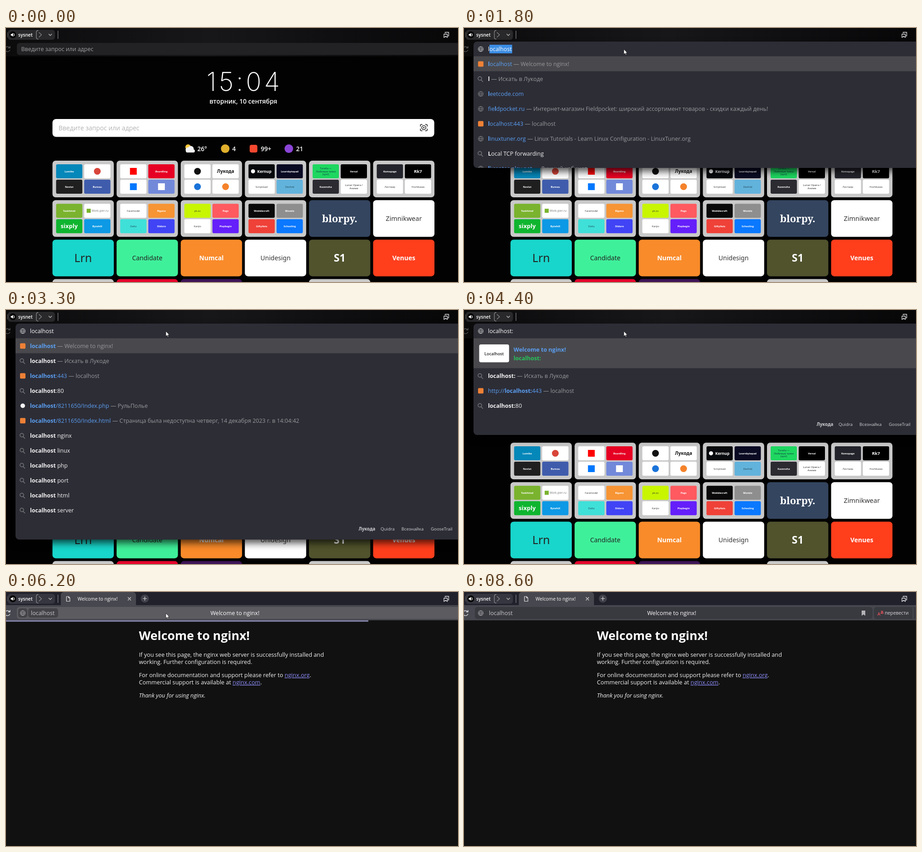
Animation of 998 by 561 pixels, one loop 9.4 s. Source, as an HTML page:

```html
<!DOCTYPE html>
<html lang="ru">
<head>
<meta charset="utf-8">
<title>Welcome to nginx!</title>
<style>
html, body { margin: 0; width: 100%; height: 100%; overflow: hidden; background: #020202; }
svg { display: block; width: 998px; height: 561px; }
text { font-family: "Open Sans", "Noto Sans", sans-serif; white-space: pre; }
.clock { font-family: Inter, sans-serif; letter-spacing: .1em; }
.tile { font-family: "Noto Sans", sans-serif; }
.slab { font-family: "Noto Serif", serif; }
.kana { font-family: "Noto Sans CJK JP", sans-serif; }
.shade { filter: drop-shadow(0 8px 8px #000a); }
</style>
</head>
<body>
<svg id="stage" viewBox="0 0 998 561"></svg>
<script>
const stage = document.getElementById('stage');
const LOOP = 9400, STEP = 100, UI = 12.5;
const BLUE = '#5b9ff2', GREY = '#98989c', WHITE = '#f2f2f2';

const esc = s => s.replace(/&/g, '&amp;');
const rect = (x, y, w, h, fill, r = 0, extra = '') =>
  `<rect x="${x}" y="${y}" width="${w}" height="${h}" rx="${r}" fill="${fill}" ${extra}/>`;
const disc = (x, y, r, fill) => `<circle cx="${x}" cy="${y}" r="${r}" fill="${fill}"/>`;
const line = (d, color, w = 1.3) =>
  `<path d="${d}" fill="none" stroke="${color}" stroke-width="${w}" stroke-linecap="round" stroke-linejoin="round"/>`;
const raw = (x, y, body, fill, size = UI, extra = '') =>
  `<text x="${x}" y="${y}" fill="${fill}" font-size="${size}" ${extra}>${body}</text>`;
const text = (x, y, s, ...rest) => raw(x, y, esc(s), ...rest);
const span = (s, attrs = '') => `<tspan ${attrs}>${esc(s)}</tspan>`;
const MID = 'text-anchor="middle"', BOLD = 'font-weight="700"', SEMI = 'font-weight="600"';

const pen = document.createElement('canvas').getContext('2d');
const widthOf = s => {
  pen.font = UI + 'px "Open Sans", "Noto Sans", sans-serif';
  return pen.measureText(s).width;
};
// value of the last key at or before t
const latest = (keys, t) => keys.filter(k => k[0] <= t).pop()[1];
const between = (keys, t) => {
  const i = keys.findIndex(k => k[0] > t);
  if (i < 0) return keys[keys.length - 1][1];
  const [a, u] = keys[i - 1], [b, v] = keys[i];
  return u + (v - u) * (t - a) / (b - a);
};

// ---------- start page ----------
// background | label (^ breaks the line) | text colour | size | mark (o disc, s square)
const FOLDERS = [
  ['#0487b9|Lumiko', '#fff||||o#d8453a', '#1f1f1f|Novlat', '#3f5cac|Bureau'],
  ['#fff||||s#f00', '#e60023|Boardling', '#fff||||s#07f', '#7289da||||s#fff'],
  ['#fff||||o#111', '#fff|Лукода|#111|10', '#fff||||o#1a73d9', '#fff||||o#f5822a'],
  ['#08090c|Kernup|#fff|8.6|o#fff', '#0a0a23|Learnbytepad', '#fff|Scriptread|#333', '#62b3dc|Devfold|#245'],
  ['#1ed760|Tunelia —^Любимые треки^(vpn!)|#134', '#000|Versal', '#2b2b31|Kazenoha', '#fff|Lunar Opera /^Аниме|#222|6'],
  ['#23242b|Komapage', '#000|Rk7||9.5', '#fff|Листмир|#333', '#fff|Hoshikawa|#333'],
  ['#7ab32e|Taskhired', '#fff|Work-pier.ru|#777|6.3|s#7ab32e', '#0fb52f|sixply||13', '#0d99e5|Bytehill'],
  ['#fff|Facemodel|#333', '#f79433|Rigano', '#3fe0d8|Delta|#245', '#4044f5|Slidoro'],
  ['#c8f500|pk.zu|#333', '#ff5a5f|Pogs', '#fff|Kanjio|#333', '#651ffa|Playbegin'],
  ['#0a0a0a|Wobblecraft', '#8e8e8e|Movelo', '#ef4138|Giftylists', '#0a78ff|Schooling']
];
const BIG = [
  '#34455f|blorpy.|#fff|22', '#fff|Zimnikwear|#333|14.5',
  '#18d6cb|Lrn|#222|25', '#3ff09a|Candidate|#222|14', '#f98b2a|Numcal|#fff|14',
  '#fff|Unidesign|#333|14', '#50532c|S1|#fff|23', '#ff3e1c|Venues|#fff|14'
];
const colX = i => 102.6 + 141.6 * (i % 6);
const rowY = i => 293 + 87.2 * Math.floor(i / 6);

function label(cx, cy, s, fill, size, extra) {
  const rows = s.split('^');
  return rows.map((r, i) =>
    text(cx, cy + size * .36 + (i - (rows.length - 1) / 2) * size * 1.2, r, fill, size, `${MID} ${extra}`)).join('');
}
function chip(x, y, def) {
  const [bg, s, fg, size, mark] = def.split('|'), cy = y + 15.5;
  let out = rect(x, y, 58, 31, bg, 3);
  if (mark) {
    const r = s ? 4.5 : 7.5, mx = s ? x + 10 : x + 29, color = mark.slice(1);
    out += mark[0] === 'o' ? disc(mx, cy, r, color) : rect(mx - r, cy - r, 2 * r, 2 * r, color);
  }
  const weight = !fg || fg === '#fff' || size > 9 ? BOLD : '';
  return out + label(x + (mark ? 35 : 29), cy, s || '', fg || '#fff', +size || 5.6, weight);
}
function buildHome() {
  let s = rect(0, 0, 998, 561, '#020202');
  s += text(526.5, 138.5, '15:04', '#fff', 57, `${MID} class="clock" font-weight="200"`);
  s += text(524, 167, 'вторник, 10 сентября', '#fff', 13.9, `${MID} ${SEMI}`);
  s += rect(102.6, 201, 843, 39.5, '#fff', 8) + text(116, 226, 'Введите запрос или адрес', '#b2b2b2', 14);
  s += line('M915 217v-2q0-2 2-2h2M926 213h2q2 0 2 2v2M930 223v2q0 2-2 2h-2M919 227h-2q-2 0-2-2v-2', '#222', 1.6)
    + line('M918 220a4.5 4.5 0 1 0 9 0a4.5 4.5 0 1 0-9 0', '#222', 1.6) + disc(922.5, 220, 1.6, '#222');
  s += disc(402, 263, 6, '#ffc93c') + disc(402, 269, 5.5, '#f4f4f6') + disc(408, 267, 6.5, '#f4f4f6')
    + rect(397, 268, 20, 7, '#f4f4f6', 3.5);
  s += disc(484, 266.5, 9.5, '#e0b02c') + rect(538, 258, 17, 17, '#f5482f', 4) + disc(624.5, 266.5, 9.5, '#8b45d6');
  [[422.5, '26°'], [499.5, '4'], [562.5, '99+'], [640.5, '21']]
    .forEach(([x, v]) => s += text(x, 271.5, v, '#fff', 13.6, SEMI));
  FOLDERS.forEach((f, i) => {
    const x = colX(i), y = rowY(i);
    s += rect(x, y, 135.4, 81, '#c9c9c9', 7);
    f.forEach((d, j) => s += chip(x + 8 + 62 * (j % 2), y + 8 + 34 * (j >> 1), d));
  });
  BIG.forEach((d, k) => {
    const i = k + FOLDERS.length, x = colX(i), y = rowY(i), [bg, t, fg, size] = d.split('|');
    const weight = fg === '#fff' ? BOLD : 'font-weight="500"';
    s += rect(x, y, 135.4, 81, bg, 7)
      + label(x + 67.7, y + 40.5, t, fg, +size, `${weight} class="${k ? 'tile' : 'slab'}"`);
  });
  ['#c9c9c9', '#e4062b', '#3d1457', '#020202', '#c9c9c9']
    .forEach((c, i) => s += rect(colX(i), rowY(18), 135.4, 81, c, 7));
  return s;
}
const HOME = buildHome();

// ---------- browser frame ----------
const reload = c => line('M8 43.5A5.6 5.6 0 1 0 8.6 49M9 40.5v3.5h-4', c, 1.4);
const globe = (x, y, c) => line(`M${x - 5.5} ${y}a5.5 5.5 0 1 0 11 0a5.5 5.5 0 1 0-11 0h11`
  + `M${x} ${y - 5.5}q-5 5.5 0 11q5-5.5 0-11`, c, 1.1);
const lens = (x, y, c) => line(`M${x - 5} ${y - 1}a4 4 0 1 0 8 0a4 4 0 1 0-8 0M${x + 1.5} ${y + 2}l4 4`, c, 1.5);

function tabStrip(pill) {
  return rect(4, 4, 104, 22, pill, 6) + line('M3.5 10v10', '#555', 1)
    + disc(15, 15, 7.5, '#000')
    + '<path d="M10.5 13.3h2.2l3-2.6v8.6l-3-2.6h-2.2z" fill="#fff"/>'
    + line('M17.5 12.5q1.8 2.5 0 5', '#fff', 1.2)
    + text(27, 18.8, 'sysnet', '#fff', 10.2, SEMI)
    + line('M71 5.5q-4 0-4 4v11q0 4 4 4M73 10l5.5 5-5.5 5', '#8a8a8e', 1.3)
    + line('M94.5 13.5l3.2 3.2 3.2-3.2', '#bbb', 1.3) + rect(114, 6, 1.4, 18, '#77777c')
    + line('M967 13.5h7.5v7.5l-3.7-2.7-3.8 2.7zM969.5 11v-1.5h8v8h-1.5', '#e4e4e6', 1.3);
}
const homeBar = () => '<linearGradient id="glass"><stop stop-color="#0b0b0c"/><stop offset=".45" stop-color="#17171a"/>'
  + '<stop offset="1" stop-color="#070708"/></linearGradient>'
  + rect(0, 0, 998, 62.5, 'url(#glass)') + tabStrip('#29292b') + reload('#555')
  + rect(24, 33, 990, 26.5, '#222225', 6);

// ---------- suggestions ----------
const ASK = ' — Искать в Лукоде';
const NGINX = ['x', 'localhost', ' — Welcome to nginx!'];
const P443 = ['x', 'localhost:443', ' — localhost'];
const P80 = ['s', 'localhost:80'];
const TCP = ['s', 'Local TCP forwarding'];
const PHP = ['p', 'localhost/8211650/Index.php', ' — РульПолье'];
const HTM = ['x', 'localhost/8211650/Index.html', ' — Страница была недоступна четверг, 14 декабря 2023 г. в 14:04:42'];
const TIME = ['s', 'localtime linux'];
const SHOP = ['o', 'market.yandex.ru/catalog--obuv/54605/list?was_redir=1&rt=10&rs=eJwz4g9gnMXInptYVJKaV7yBkREAKAYE4Q%2C%2C&suggest=1&suggest_type=search&suggest'];
const FEST = ['', 'fandomfest.intickets.ru/event/16565930/?locale=ru_RU', ' — Мульти Слёт ЛугоПарк 2024'];

function rowsFor(q) {
  const ask = ['s', q, ASK];
  if (q === 'l') return [NGINX, ask, ['g', 'leetcode.com'],
    ['g', 'fieldpocket.ru', ' — Интернет-магазин Fieldpocket: широкий ассортимент товаров - скидки каждый день!'],
    P443, ['g', 'linuxtuner.org', ' — Linux Tutorials - Learn Linux Configuration - LinuxTuner.org'],
    TCP, ['g', 'lkcenter-play.net', ' — Личный кабинет'], P80, PHP, HTM, TIME];
  if (q.length < 6) return [NGINX, ask, P443, TCP, P80, PHP, HTM, TIME, SHOP, FEST];
  if (q.length < 10) return [NGINX, ask, P443, P80, PHP, HTM,
    ...['nginx', 'linux', 'php', 'port', 'html', 'server'].map(w => ['s', 'localhost ' + w])];
  if (q.length === 10) return [ask, ['x', 'http://localhost:443', ' — localhost'], P80];
  return q.length === 11 ? [ask, P80, P443, PHP, HTM] : [ask, P443, PHP, HTM];
}
const ICONS = {
  s: y => lens(36, y, '#77777c'),
  g: y => globe(37, y, '#77777c'),
  x: y => rect(31, y - 6, 12, 12, '#ee8136', 2),
  p: y => disc(37, y, 5, '#f4f4f4'),
  o: y => disc(37, y, 6.5, '#f5822a')
};
function suggestion([kind, s, tail = ''], y, q) {
  const i = s.toLowerCase().indexOf(q), end = i + q.length;
  const main = i < 0 ? span(s) : span(s.slice(0, i)) + span(s.slice(i, end), BOLD) + span(s.slice(end));
  return (kind && ICONS[kind](y))
    + raw(53, y + 4.5, main + span(tail, `fill="${GREY}"`), kind === 's' ? WHITE : BLUE);
}

const TYPED = [[1700, 'l'], [2000, 'lo'], [2200, 'loc'], [2300, 'loca'], [2400, 'local'], [2700, 'localh'],
  [2800, 'localho'], [3000, 'localhos'], [3300, 'localhost'], [3900, 'localhost:'], [4700, 'localhost:8'], [4900, 'localhost:80']];
const BOTTOM = [[1700, 129], [1800, 309], [1900, 441], [2000, 507], [2200, 441], [2700, 441], [2800, 507],
  [3900, 507], [4300, 276], [4700, 276], [4800, 342], [4900, 309]];

function panel(t) {
  const q = latest(TYPED, t), bottom = between(BOTTOM, t), rows = rowsFor(q), card = q.length > 9;
  const first = card ? 2 : 0, foot = 111 + 33 * (rows.length + first);
  const rest = 'localhost'.slice(q.length), w = widthOf(q);
  let s = rect(21, 30, 990, bottom - 30, '#2d2d36', 8, 'class="shade"')
    + `<clipPath id="fold">${rect(21, 30, 990, bottom - 30, '#fff', 8)}</clipPath><g clip-path="url(#fold)">`;
  s += rect(21, 62.5, 977, card ? 66 : 33, '#49494d') + globe(37, 46.5, '#b4b4b8');
  if (rest) s += rect(53 + w, 37, widthOf(rest) + 1, 19, '#3b8de4');
  s += text(53, 51, q + rest, '#fff');
  if (q.length === 12 && (t < 5300 || t >= 5900)) s += rect(53 + w, 36.5, 1.3, 19, '#fff');
  if (card) {
    const colon = q.endsWith(':');
    s += rect(33.5, 76, 66, 39.5, '#fff', 4) + text(66.5, 99.5, 'Localhost', '#222', 9.3, `${MID} ${SEMI}`)
      + text(109.5, 91.5, 'Welcome to nginx!', BLUE, 12.6, BOLD)
      + text(109.5, 111, colon ? q : 'localhost', '#27c45c', UI, colon ? BOLD : '');
  }
  rows.forEach((r, i) => s += suggestion(r, 79.5 + 33 * (i + first), q));
  [[778.5, 'Лукода', BOLD], [827, 'Quidra'], [873, 'Всезнайка'], [938, 'GooseTrail']]
    .forEach(([x, n, b = '']) => s += text(x, foot - 20.5, n, '#d0d0d4', 9.7, b));
  return s + '</g>';
}

// ---------- web page ----------
function page(t) {
  const hover = t < 8300, ready = t >= 7100, tool = '#47474f', field = hover ? '#5b5b60' : '#393940';
  let s = rect(0, 0, 998, 561, '#111') + rect(0, 0, 998, 30, '#21212c') + rect(0, 29, 998, 33.5, tool)
    + `<path d="M121 30V8q0-8 8-8h150q8 0 8 8v22z" fill="${tool}"/>` + tabStrip('#363640') + reload('#e0e0e4');
  s += line('M133.5 10h4.5l3 3v7.5h-7.5zM138 10v3h3', '#e4e4e6', 1.2)
    + text(158, 19, 'Welcome to nginx!', '#fff', 10.3)
    + line('M269.5 12l6 6M275.5 12l-6 6', '#ddd', 1.2) + disc(306.5, 14.5, 9, '#41414b')
    + line('M302.5 14.5h8M306.5 10.5v8', '#ddd', 1.2);
  s += rect(24, 33, ready ? 878 : 990, 26.5, field, 6);
  if (hover) s += rect(27, 36, 20, 20.5, '#434347', 5) + rect(49, 36, 66, 20.5, '#434347', 5);
  s += globe(37, 46.5, '#9a9a9f') + text(55, 51, 'localhost', '#c9c9cd')
    + text(ready ? 458.5 : 505.5, 51, 'Welcome to nginx!', '#fff', 12.6, MID);
  if (ready) {
    const ink = t < 7300 ? .2 : t < 7400 ? .6 : 1;
    s += '<path d="M878 41h8v11.5l-4-3-4 3z" fill="#b4b4b8"/>' + rect(905, 33, 110, 26.5, '#393940', 6)
      + `<g opacity="${ink}">` + text(913, 51.5, 'A', '#f0565a', 9.5, SEMI)
      + text(919, 47.5, 'あ', '#f0565a', 8, `${BOLD} class="kana"`)
      + text(929, 49.5, 'перевести', '#d8d8dc', 10.4) + '</g>' + rect(991, 34, 1, 25, '#55555c');
  }
  if (t >= 6200) {
    const p = (y, body, extra) => raw(293.5, y, body, '#f4f4f4', 12.7, extra);
    const link = u => span(u, 'fill="#8c8cf8" text-decoration="underline"');
    s += text(293.5, 106, 'Welcome to nginx!', '#fff', 26.7, BOLD)
      + p(143, 'If you see this page, the nginx web server is successfully installed and')
      + p(159, 'working. Further configuration is required.')
      + p(188, `For online documentation and support please refer to ${link('nginx.org')}.`)
      + p(204, `Commercial support is available at ${link('nginx.com')}.`)
      + p(232.5, 'Thank you for using nginx.', 'font-style="italic"');
  }
  if (t < 6500) s += rect(0, 62.5, Math.min(998, (t - 6000) * 4), 3, '#8a8ab4');
  return s;
}

// ---------- pointer ----------
function pointer(t) {
  if (t < 100 || t >= 8600) return '';
  let x = 353, y = 47;
  if (t < 900) {
    const k = (1 - (t - 100) / 800) ** 2;
    x += 500 * k; y += 497 * k;
  } else if (t >= 8300) {
    const k = (t - 8200) / 100;
    x -= 114 * k; y += 64 * k;
  }
  if ((t >= 900 && t < 1700) || (t >= 5900 && t < 6100))
    return line('M352 41.5h1.5l1 .8 1-.8h1.5M354.5 42v10M352 52.5h1.5l1-.8 1 .8h1.5', '#fff', 1);
  return `<path transform="translate(${x} ${y})" d="M0 0v11l2.6-2.4 1.7 3.6 1.7-.8-1.7-3.4h3.3z" fill="#fff" stroke="#000" stroke-width=".6"/>`;
}

function scene(t) {
  if (t >= 6100) return page(t) + pointer(t);
  let s = HOME + homeBar();
  if (t < 1700) {
    s += text(33.5, 51, 'Введите запрос или адрес', '#a0a0a3');
    if (t >= 900 && t < 1400) s += rect(33, 36, 1.5, 19, '#fff');
  } else s += panel(t);
  return s + pointer(t);
}

let shown = -1;
const start = performance.now();
function tick() {
  const t = Math.floor((performance.now() - start) % LOOP / STEP) * STEP;
  if (t !== shown) stage.innerHTML = scene(shown = t);
  requestAnimationFrame(tick);
}
tick();
</script>
</body>
</html>
```
